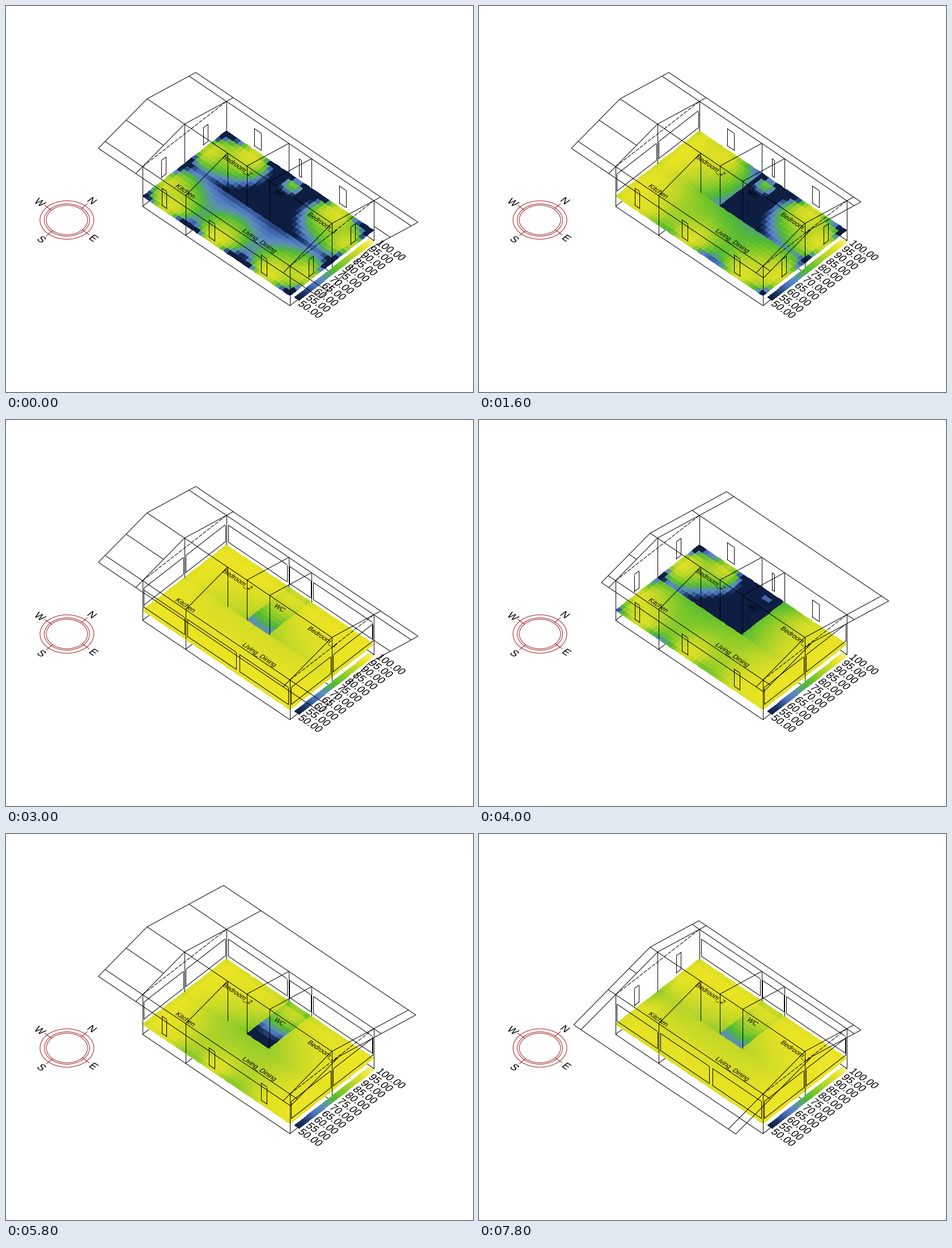
Recreate the animation shown at these times as a matplotlib script. Size 824 by 680 pixels, loop 8000 ms.

```python
import numpy as np
import matplotlib.pyplot as plt
from matplotlib.animation import FuncAnimation
from matplotlib.collections import LineCollection
from matplotlib.colors import LinearSegmentedColormap
from matplotlib.patches import Ellipse, PathPatch
from matplotlib.textpath import TextPath
from matplotlib.transforms import Affine2D

W, H, DPI = 824, 680, 100
LEN, DEP = 13.0, 7.4                 # plan size in metres
EAST = np.array([260.0, 175.0])      # screen vectors of the whole plan
NORTH = np.array([148.0, -115.0])
ORIGIN = np.array([241.0, 353.0])
WALL = 70.0
DESK = 18 / 70                       # height of the analysis plane
SILL, HEAD = 25 / 70, 55 / 70
KIT, WC0, WC1 = 0.292, 0.423, 0.577  # partition positions along the plan
PX = 72 / DPI


def point(u, v, z=0.0):
    x, y = ORIGIN + u * EAST + v * NORTH
    return x, y - z * WALL


def roof(u, v):
    return point(u, v, 1.25 - 0.5 * abs(v - 0.5))


def chain(*pts):
    return list(zip(pts[:-1], pts[1:]))


# wall, room, start, end
BAYS = [
    ("S", "living", 0, KIT),
    ("S", "living", KIT, (1 + KIT) / 2),
    ("S", "living", (1 + KIT) / 2, 1),
    ("W", "living", 0, 0.5),
    ("E", "living", 0, 0.5),
    ("W", "bed2", 0.5, 1),
    ("N", "bed2", 0, WC0),
    ("N", "wc", WC0, WC1),
    ("N", "bed1", WC1, 1),
    ("E", "bed1", 0.5, 1),
]
GAIN = {"N": 0.85, "S": 1.0, "E": 1.2, "W": 1.2}
SHADE = {"N": 0.5, "S": 0.6, "E": 0.6, "W": 0.6}


def design(i):
    """Two-level fractional factorial: glazing and overhang of each side."""
    b = [i >> k & 1 for k in range(6)]
    glass = {"N": b[0], "S": b[1], "E": b[2], "W": b[3]}
    eave = {"N": b[4], "S": b[5],
            "E": 1 - (b[0] + b[1] + b[2] + b[3]) % 2,
            "W": 1 - (b[0] + b[1] + b[4] + b[5]) % 2}
    return glass, eave


def span(a, b, big):
    mid, half = (a + b) / 2, (b - a) / 2 * (0.94 if big else 0.117)
    return mid - half, mid + half


def on_wall(wall, s, z):
    if wall in "SN":
        return point(s, float(wall == "N"), z)
    return point(float(wall == "E"), s, z)


# daylight on the analysis grid
NU, NV = 40, 22
gu, gv = np.meshgrid((np.arange(NU) + 0.5) / NU, (np.arange(NV) + 0.5) / NV)
ROOMS = {
    "living": gv < 0.5,
    "bed2": (gv > 0.5) & (gu < WC0),
    "wc": (gv > 0.5) & (gu > WC0) & (gu < WC1),
    "bed1": (gv > 0.5) & (gu > WC1),
}
RISE, FLOOR = 0.8, 0.03              # window height above desk, least light


def daylight(glass, eave):
    light = np.zeros_like(gu)
    for wall, room, a, b in BAYS:
        a, b = span(a, b, glass[wall])
        size, cross = (LEN, gu) if wall in "SN" else (DEP, gv)
        depth = {"S": gv * DEP, "N": (1 - gv) * DEP,
                 "W": gu * LEN, "E": (1 - gu) * LEN}[wall]
        power = (b - a) * size / 0.64 * GAIN[wall]
        if eave[wall]:
            power *= SHADE[wall]
        direct, bounce = (0.5, 0.05) if room == "wc" else (1, 0.035)
        part = np.zeros_like(gu)
        for t in (np.arange(9) + 0.5) / 9:
            r2 = depth ** 2 + ((cross - a - t * (b - a)) * size) ** 2
            part += depth * (direct * RISE / (r2 + RISE ** 2) ** 2
                             + bounce / (r2 + 2))
        light += np.where(ROOMS[room], part * power / 9, 0)
    return 50 + 46 * (1 - FLOOR / np.maximum(light, FLOOR))


def window_lines(glass):
    out = []
    for wall, _, a, b in BAYS:
        a, b = span(a, b, glass[wall])
        c = [on_wall(wall, s, z) for s, z in
             ((a, SILL), (b, SILL), (b, HEAD), (a, HEAD))]
        out += chain(*c, c[0])
    return out


def roof_lines(eave):
    w, e = (0.254 if eave[k] else 0.05 for k in "WE")
    n, s = (0.412 if eave[k] else 0.081 for k in "NS")
    u0, u1, v0, v1 = -w, 1 + e, -s, 1 + n
    out = chain(roof(u1, v0), roof(u0, v0), roof(u0, 0.5), roof(u0, v1),
                roof(u1, v1), roof(u1, 0.5), roof(u1, v0))
    for v in (0, 1):
        out += chain(roof(u0, v), roof(0, v)) + chain(roof(1, v), roof(u1, v))
    out += chain(roof(u0, 0.5), roof(0, 0.5))
    out += chain(roof(u0, 0.25), roof(0, 0.25))
    if eave["E"]:
        out += chain(roof(1.142, 0.75), roof(u1, 0.75))
    for u in (0, 1):
        out += chain(roof(u, v0), roof(u, 0)) + chain(roof(u, 1), roof(u, v1))
    return out


fig = plt.figure(figsize=(W / DPI, H / DPI), dpi=DPI, facecolor="white")
ax = fig.add_axes([0, 0, 1, 1])
ax.set_xlim(0, W)
ax.set_ylim(H, 0)
ax.axis("off")


def add_lines(segs, z, color="black", style="solid"):
    lc = LineCollection(segs, colors=color, linewidths=PX, linestyles=style,
                        zorder=z)
    return ax.add_collection(lc)


def ground_text(s, x, y, em, center=False):
    """Text lying in the plan; em is its size in metres."""
    path = TextPath((0, 0), s, size=1, prop={"family": "Liberation Sans"})
    ex, ey = EAST / LEN * em, NORTH / DEP * em
    if center:
        box = path.get_extents()
        mid = (box.x0 + box.x1) / 2 * ex + (box.y0 + box.y1) / 2 * ey
        x, y = x - mid[0], y - mid[1]
    m = Affine2D(np.array([[ex[0], ey[0], x], [ex[1], ey[1], y], [0, 0, 1]]))
    ax.add_patch(PathPatch(m.transform_path(path), fc="black", lw=0, zorder=5))


stops = [(0, "#0d1e42"), (0.1, "#1d3769"), (0.22, "#476fb9"),
         (0.32, "#5b8abf"), (0.4, "#559f86"), (0.48, "#4fb934"),
         (0.6, "#7cc82a"), (0.75, "#b9d528"), (0.9, "#ebe423"),
         (1, "#f4f082")]
cmap = LinearSegmentedColormap.from_list("day", stops)

# building frame: parts under the analysis plane, then parts above it
posts = [(0, 0), (KIT, 0), (1, 0), (0, 0.5), (KIT, 0.5), (WC0, 0.5),
         (WC1, 0.5), (1, 0.5), (0, 1), (WC0, 1), (WC1, 1), (1, 1)]
base = [((0, 0), (1, 0)), ((0, 1), (1, 1)), ((0, 0), (0, 1)),
        ((1, 0), (1, 1)), ((0, 0.5), (1, 0.5)), ((KIT, 0), (KIT, 0.5)),
        ((WC0, 0.5), (WC0, 1)), ((WC1, 0.5), (WC1, 1))]
add_lines([(point(*a), point(*b)) for a, b in base]
          + [(point(*p), point(*p, DESK)) for p in posts], 1)

frame = [(point(*p, DESK), roof(*p)) for p in posts]
for v in (0, 0.5, 1):
    frame += chain(roof(0, v), roof(1, v))
for u in (0, 1):
    frame += chain(roof(u, 0), roof(u, 0.5), roof(u, 1))
frame += chain(roof(KIT, 0), roof(KIT, 0.5))
for u in (WC0, WC1):
    frame += chain(roof(u, 0.5), roof(u, 1))
add_lines(frame, 3)
add_lines([(point(u, 0, 1), point(u, 1, 1)) for u in (0, 1)], 3,
          style=(0, (7, 2)))

# analysis grid
eu, ev = np.meshgrid(np.linspace(0, 1, NU + 1), np.linspace(0, 1, NV + 1))
mx, my = (ORIGIN[k] + eu * EAST[k] + ev * NORTH[k] for k in (0, 1))
grid = ax.pcolormesh(mx, my - DESK * WALL, daylight(*design(0)), cmap=cmap,
                     vmin=50, vmax=100, antialiased=False, zorder=2)

# legend
t, side = np.meshgrid(np.linspace(0, 1, 101), [0, 1])
ax.pcolormesh(509 + 132 * t + 9 * side, 513 - 103 * t + 5.5 * side,
              np.linspace(0, 1, 100)[None, :], cmap=cmap, vmin=0, vmax=1,
              antialiased=False, zorder=2)
for k in range(11):
    ground_text(f"{50 + 5 * k:.2f}", 514 + 13.8 * k, 526 - 10.7 * k, 0.74)

for name, x, y in (("Bedroom_2", 381, 267), ("Kitchen", 298, 318),
                   ("WC", 472, 328), ("Bedroom_1", 531, 368),
                   ("Living_Dining", 416, 397)):
    ground_text(name, x, y, 0.475)

# compass
RED = "#a01c20"
for r in (47.5, 40, 36.5):
    ax.add_patch(Ellipse((107.5, 377), 2 * r, 1.425 * r, fill=False, ec=RED,
                         lw=PX, zorder=3))
add_lines([((133, 357), (144, 348)), ((71, 405), (82, 396)),
           ((134, 394), (147, 403)), ((68, 351), (81, 360))], 3, RED)
for s, x, y in (("W", 60, 346), ("N", 152, 343), ("S", 63, 411),
                ("E", 155, 409)):
    ground_text(s, x, y, 0.72, center=True)

moving = add_lines([], 3)


def draw(i):
    glass, eave = design(i)
    grid.set_array(daylight(glass, eave))
    moving.set_segments(window_lines(glass) + roof_lines(eave))
    return grid, moving


anim = FuncAnimation(fig, draw, frames=40, interval=200, repeat=True,
                     repeat_delay=0, blit=False)
plt.show()
```
